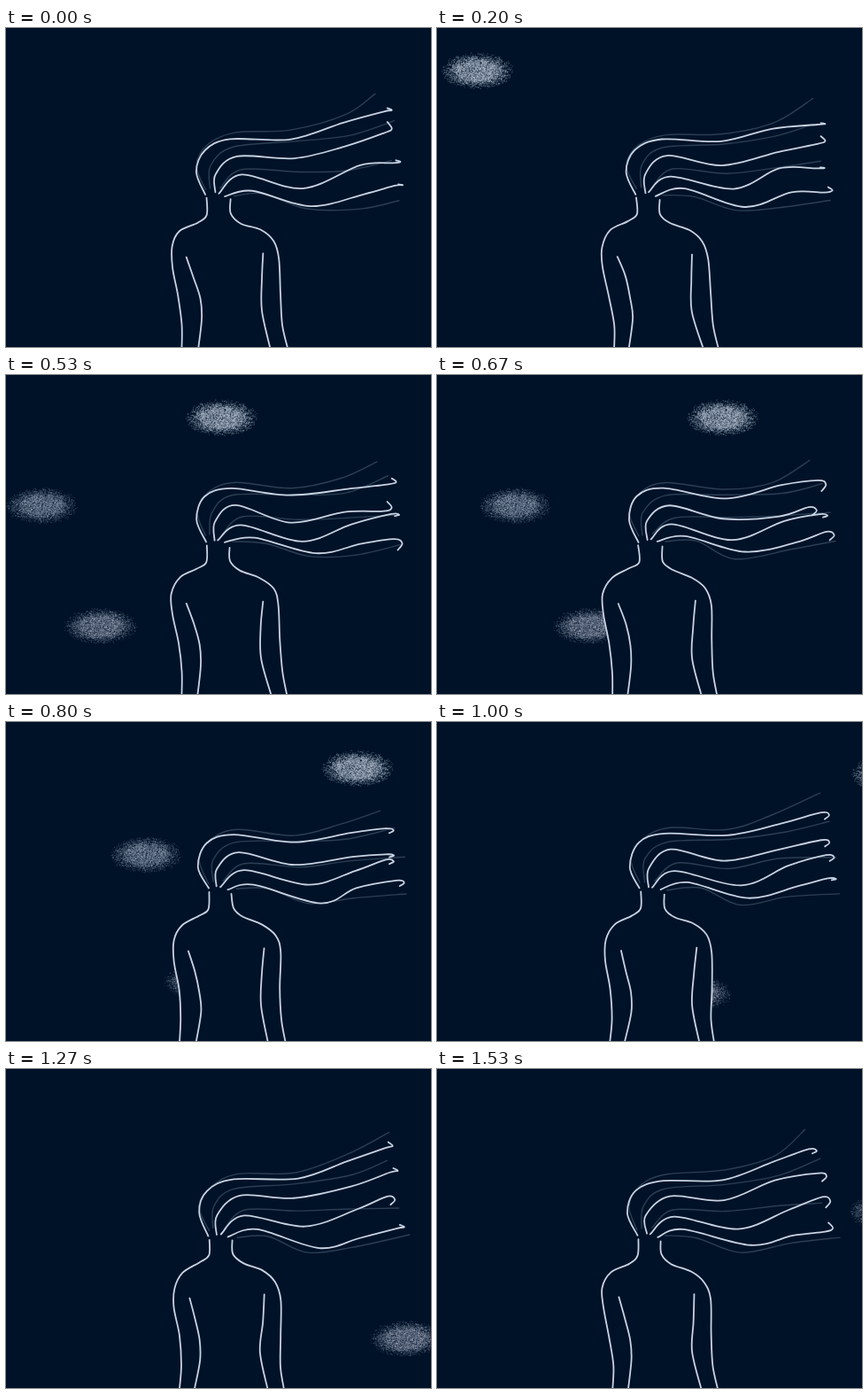
An HTML page with a canvas that plays this animation: 480 px wide and 360 px high, repeating every 1.59 s.

```html
<!DOCTYPE html>
<html lang="en">
<head>
<meta charset="utf-8">
<title>Hair in the night wind</title>
<style>
html, body { margin: 0; width: 100%; height: 100%; overflow: hidden; background: #001228; }
canvas { display: block; width: 480px; height: 360px; }
</style>
</head>
<body>
<canvas id="stage" width="480" height="360"></canvas>
<script>
const LOOP = 1590, STEPS = 24;
const NIGHT = '#001228', LIGHT = '#c8d3e3', DIM = '#2c3e53';
const ctx = document.getElementById('stage').getContext('2d');

const points = text => text.split(' ').map(s => s.split(',').map(Number));

// drop: how far the tip sinks when the wind slackens
const hair = [
  { drop: 16, pts: points('227,188 216,163 225,137 255,126 325,130 385,116 425,105') },
  { drop: 20, pts: points('237,186 237,165 262,145 325,156 385,143 425,132') },
  { drop: 8, pts: points('241,186 267,167 338,182 395,161 433,154') },
  { drop: 0, pts: points('249,189 280,182 350,202 400,188 437,181') }
];
const wisps = [
  { drop: 18, pts: points('227,182 217,155 230,132 260,120 325,122 380,106 424,83') },
  { drop: 8, pts: points('232,180 233,155 257,135 325,132 385,125 435,110') },
  { drop: 0, pts: points('244,180 268,160 330,163 385,158 442,154') },
  { drop: 0, pts: points('258,189 295,189 340,205 395,200 448,190') }
];
// Left side, right side, left arm, right arm
const body = [
  '228,192 228,211 217,219 198,229 188,247 188,270 195,302 198,335 198,362',
  '254,194 255,210 266,220 288,228 303,241 309,260 310,300 311,335 316,362',
  '205,258 213,281 219,305 220,328 215,362',
  '291,255 289,285 288,320 298,362'
].map(points);

// Key points of each drift as [step, x, y]
const clouds = [
  { glow: 0.26, keys: [[3, 45, 48], [10, 322, 48], [15, 508, 58]] },
  { glow: 0.16, keys: [[6, -8, 147], [10, 88, 147], [15, 262, 153], [23, 506, 160]] },
  { glow: 0.17, keys: [[6, 41, 283], [10, 172, 283], [15, 291, 306], [19, 452, 304]] }
];

const mix = (a, b, u) => a + (b - a) * u;
const clamp = v => Math.max(0, Math.min(1, v));
const wave = (step, peak) => Math.cos((step - peak) / STEPS * Math.PI * 2);

function random(seed) {
  seed = seed * 7919 + 12345;
  return () => (seed = seed * 16807 % 2147483647) / 2147483647;
}

function smooth(p) {
  const at = i => p[Math.max(0, Math.min(p.length - 1, i))];
  const grip = (i, dir) => [0, 1].map(k => at(i)[k] + dir * (at(i + 1)[k] - at(i - 1)[k]) / 6);
  ctx.beginPath();
  ctx.moveTo(...p[0]);
  for (let i = 0; i < p.length - 1; i++) {
    ctx.bezierCurveTo(...grip(i, 1), ...grip(i + 1, -1), ...p[i + 1]);
  }
}

function stroke(pts, color, width) {
  smooth(pts);
  ctx.strokeStyle = color;
  ctx.lineWidth = width;
  ctx.stroke();
}

function mask(a, b) {
  smooth([...a, ...[...b].reverse()]);
  ctx.fillStyle = NIGHT;
  ctx.fill();
}

// Upper body and feet of the drawing lean opposite ways
function lean(step, y) {
  return -2.5 * wave(step, 4) * mix(1, -1, clamp((y - 250) / 110));
}

// Every step is a fresh drawing, looser towards the tips
function strand({ drop, pts }, step, rnd) {
  const wob = size => (rnd() * 2 - 1) * size;
  return pts.map(([x, y]) => {
    const free = clamp((x - 245) / 180);
    return [x + lean(step, y) + wob(1 + 7 * free),
            y + drop * free * wave(step, 9) + wob(1 + 4 * free)];
  });
}

function hooked(pts, rnd) {
  const [x, y] = pts[pts.length - 1], h = rnd() * 2 - 1;
  return [...pts, [x + 9, y + 5 * h], [x + 4, y + 13 * h]];
}

function cloudAt(keys, step) {
  let i = 0;
  while (i < keys.length - 2 && keys[i + 1][0] <= step) i++;
  const [s, x, y] = keys[i], [s2, x2, y2] = keys[i + 1];
  const u = (step - s) / (s2 - s);
  return [mix(x, x2, u), mix(y, y2, u)];
}

function puff({ glow, keys }, step, seed) {
  const [x, y] = cloudAt(keys, step), rnd = random(seed);
  ctx.fillStyle = `rgba(205,215,232,${glow})`;
  for (let i = 0; i < 5000; i++) {
    const a = rnd() * Math.PI * 2, r = (rnd() + rnd()) / 2;
    ctx.fillRect(x + Math.cos(a) * r * 42, y + Math.sin(a) * r * 21, 1, 1);
  }
}

function draw(step) {
  const rnd = random(step + 1);
  const locks = hair.map(s => hooked(strand(s, step, rnd), rnd));
  const faint = wisps.map(s => strand(s, step, rnd));
  const figure = body.map(line => line.map(([x, y]) =>
    [x + lean(step, y) + rnd() * 2 - 1, y + rnd() * 2 - 1]));

  ctx.fillStyle = NIGHT;
  ctx.fillRect(0, 0, 480, 360);
  clouds.forEach((c, i) => puff(c, step, i + 50));
  mask(locks[0], locks[3]);
  mask(figure[0], figure[1]);
  faint.forEach(s => stroke(s, DIM, 1.4));
  [...locks, ...figure].forEach(s => stroke(s, LIGHT, 1.8));
}

ctx.lineCap = ctx.lineJoin = 'round';
const starts = Array.from({ length: STEPS }, (_, k) => Math.round(k * 20 / 3) * 10);
const begin = performance.now();
let shown = -1;

function tick() {
  const t = (performance.now() - begin) % LOOP;
  const step = starts.filter(s => s <= t).length - 1;
  if (step !== shown) draw(shown = step);
  requestAnimationFrame(tick);
}
tick();
</script>
</body>
</html>
```
